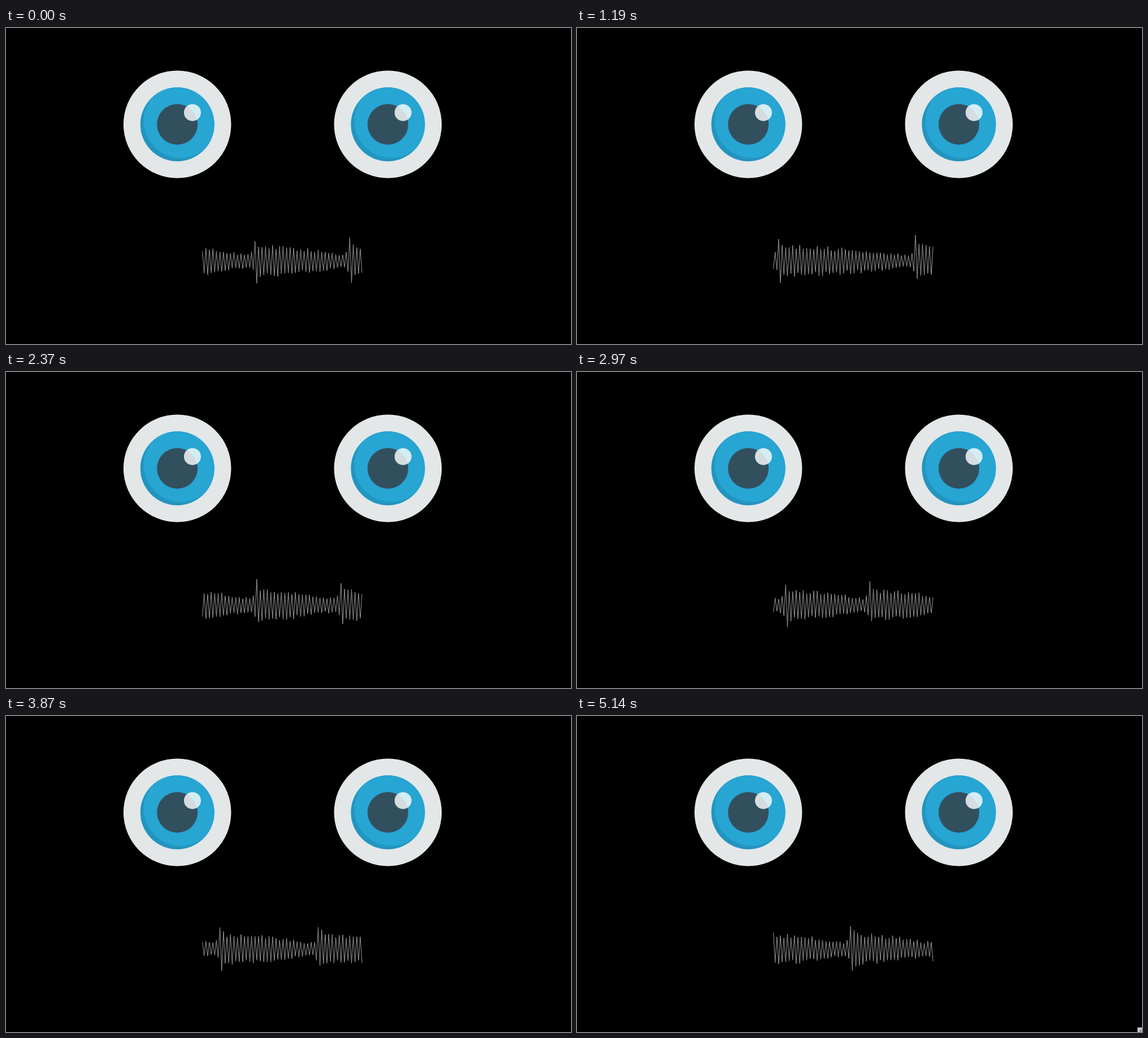
An HTML page with a canvas that plays this animation: 1000x560 px, repeating every 5190 ms.

```html
<!DOCTYPE html>
<html>
<head>
<meta charset="utf-8">
<style>
  html, body { margin: 0; width: 100%; height: 100%; overflow: hidden; background: #000; }
  canvas { display: block; }
</style>
</head>
<body>
<canvas id="stage" width="1000" height="560"></canvas>
<script>
const ctx = document.getElementById('stage').getContext('2d');
const LOOP = 5190, STEP = 70, SAMPLES = 92, SCROLL = 9;

// Each phrase is a train of voice pulses: the first onset and the gap, in samples
const phrases = [
  { at: 0, onset: 30, gap: 54 },
  { at: 490, onset: 9, gap: 78 },
  { at: 1190, onset: 3, gap: 78 },
  { at: 2370, onset: 31, gap: 48 },
  { at: 3370, onset: 3, gap: 56 },
  { at: 4410, onset: 37, gap: 48 },
  { at: 5060, onset: 44, gap: 48 }
];

const mod = (a, n) => (a % n + n) % n;

function random(n) {
  return mod(Math.sin(n * 12.9898) * 43758.5453, 1);
}

// A sharp attack at the pulse, then a slow decay towards the next one
function loudness(d, gap) {
  const attack = Math.exp(-Math.min(d, gap - d) / 1.6);
  const decay = 1 - (d / gap) ** 2;
  return 8 + 17 * decay + 19 * attack;
}

function disc(x, y, r, fill) {
  ctx.beginPath();
  ctx.arc(x, y, r, 0, Math.PI * 2);
  ctx.fillStyle = fill;
  ctx.fill();
}

function eye(x, open) {
  ctx.save();
  ctx.translate(x, 170.8);
  ctx.scale(1, open);
  disc(0, 0, 95.3, '#e3e7e8');
  disc(0, 0, 65.5, '#2295bf');
  ctx.save();
  ctx.clip();
  disc(6, -6, 65.5, '#27a5d3');
  ctx.restore();
  disc(0, 0, 36, '#324f5e');
  disc(26.8, -20.9, 15, 'rgba(255,255,255,0.8)');
  ctx.restore();
}

// Two evenly spaced blinks per loop
function openness(t) {
  const d = Math.abs(t % (LOOP / 2) - 590);
  return Math.max(0.05, Math.min(1, d / 95));
}

function mouth(t) {
  const { at, onset, gap } = phrases.findLast(p => p.at <= t);
  const steps = at === 5060 ? 0 : Math.floor((t - at) / STEP);
  const start = onset + steps * SCROLL;
  ctx.beginPath();
  for (let i = 0; i < SAMPLES; i++) {
    const d = mod(i - start, gap);
    const jitter = 0.8 + 0.35 * random(i - start + at);
    const y = Math.min(46, loudness(d, gap) * jitter);
    ctx.lineTo(347.6 + i * 3.105, 413 + (d % 2 ? y : -y));
  }
  ctx.strokeStyle = '#989898';
  ctx.lineWidth = 1;
  ctx.lineJoin = 'round';
  ctx.stroke();
}

function corner(t) {
  if (t < 4340) return;
  ctx.fillStyle = t < 5140 ? '#fff' : '#c4c4c4';
  ctx.fillRect(992, 552, 8, 8);
  ctx.fillStyle = '#777';
  ctx.fillRect(996, 557, 3, 2);
}

function draw(now) {
  const t = now % LOOP;
  ctx.fillStyle = '#000';
  ctx.fillRect(0, 0, 1000, 560);
  const open = openness(t);
  eye(303.2, open);
  eye(675.9, open);
  mouth(t);
  corner(t);
}

let start;
function tick(now) {
  start ??= now;
  draw(now - start);
  requestAnimationFrame(tick);
}
draw(0);
requestAnimationFrame(tick);
</script>
</body>
</html>
```
